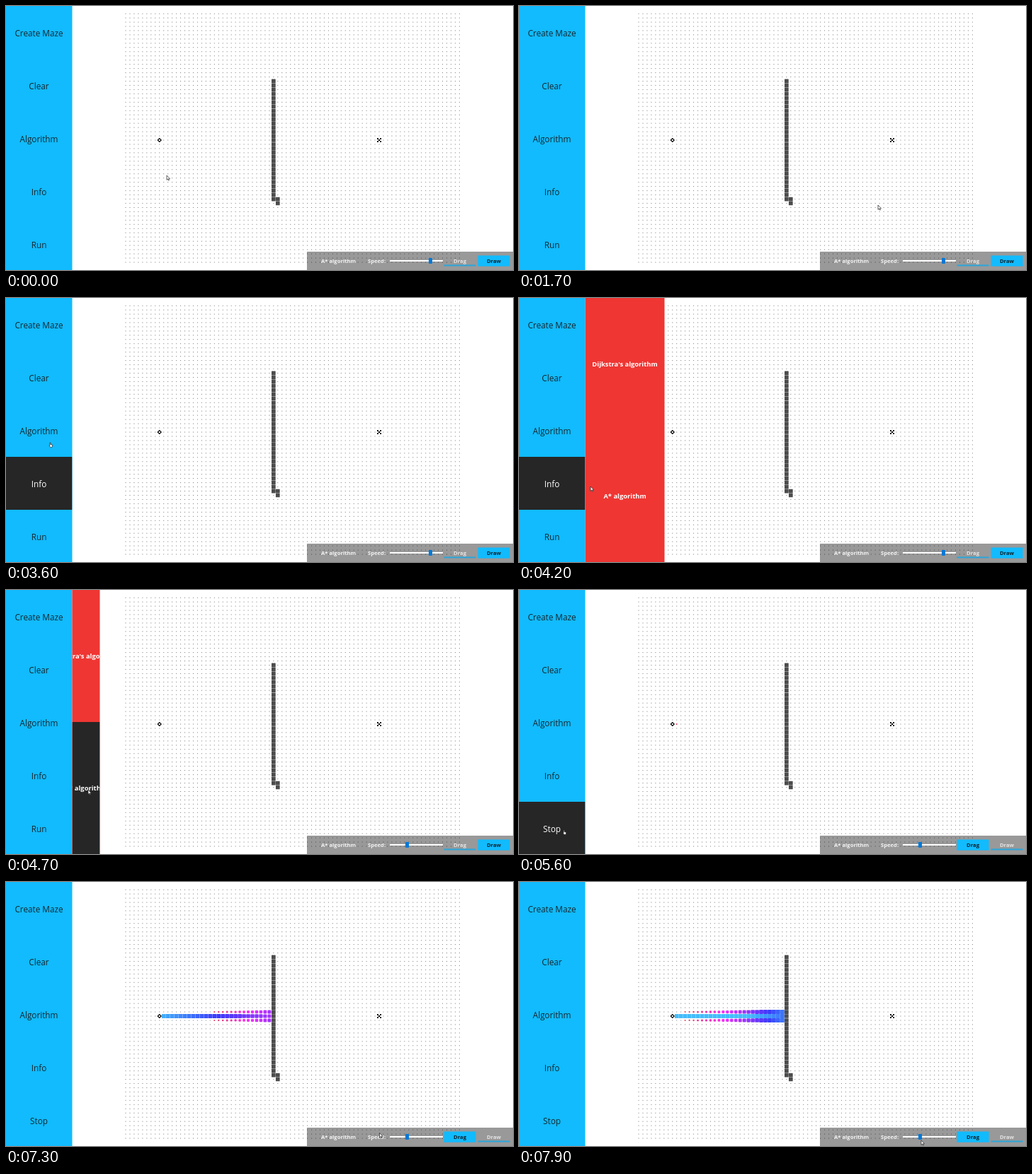
An HTML page with a canvas for the animation above (8 s loop, 716 px wide and 374 px high).

```html
<!DOCTYPE html>
<html lang="en">
<head>
<meta charset="utf-8">
<title>Pathfinding</title>
<style>
  html, body { margin: 0; width: 100%; height: 100%; overflow: hidden; background: #fff; }
  body { position: relative; font-family: "Open Sans", "Noto Sans", sans-serif; }
  canvas { position: absolute; left: 0; top: 0; width: 716px; height: 374px; }
  nav, #panel { position: absolute; top: 0; display: flex; flex-direction: column; overflow: hidden; transform: translateX(-.5px); }
  nav { left: 0; width: 94px; height: 375px; background: #11bbfd; color: #16262e; font-size: 11.75px; }
  #panel { left: 94px; height: 374px; background: #ef3633; color: #fff; font-size: 9.4px; font-weight: 700; }
  nav div, #panel div { flex: 1; display: flex; align-items: center; justify-content: center; white-space: nowrap; overflow: hidden; }
  #panel span { flex: none; }
  div.hover { background: #262626; color: #fff; }
  #bar { position: absolute; left: 425px; top: 348px; width: 291px; height: 26px;
         background: rgba(0, 0, 0, .4); color: #f4f4f4; font-size: 7.65px; font-weight: 700; line-height: 15px; }
  #bar > * { position: absolute; white-space: nowrap; }
  #bar .label { top: 6px; }
  .track { left: 117px; top: 12px; width: 75px; height: 2px; background: #fff; }
  #thumb { top: 9px; width: 5px; height: 8px; border-radius: 1px; background: #0078d7; }
  .tab { top: 6px; width: 45px; height: 15px; box-sizing: border-box; text-align: center; color: #e4e4e4;
         border-bottom: 2px solid #2ba6dc; transform: translate(-.5px, -.5px); }
  .tab.on { background: #11bbfd; border-color: #11bbfd; color: #10222b; }
  #cursor { position: absolute; left: 0; top: 0; width: 12px; height: 14px; overflow: visible; }
  #cursor path { stroke: #222; stroke-width: .7; fill: #fff; stroke-linejoin: round; }
</style>
</head>
<body>
<canvas id="grid" width="716" height="374"></canvas>
<nav>
  <div>Create Maze</div>
  <div>Clear</div>
  <div>Algorithm</div>
  <div>Info</div>
  <div id="run">Run</div>
</nav>
<div id="panel">
  <div><span>Dijkstra's algorithm</span></div>
  <div><span>A* algorithm</span></div>
</div>
<div id="bar">
  <span class="label" style="left:20px">A* algorithm</span>
  <span class="label" style="left:86px">Speed:</span>
  <i class="track"></i><i id="thumb"></i>
  <span id="drag" class="tab" style="left:194px">Drag</span>
  <span id="draw" class="tab" style="left:242px">Draw</span>
</div>
<svg id="cursor"><path id="shape"/></svg>
<script>
const LOOP = 8000, STEP = 100;
const PITCH = 5.967, LEFT = 169, TOP = 11, COLS = 80, ROWS = 60;
const START_COL = 8, GOAL_COL = 60, MID_ROW = 30, WALL_COL = 35;
const NAV_WIDTH = 93.5, PANEL_WIDTH = 112;
const OPEN_AT = 3950, PICK_AT = 4540, RUN_AT = 5500, SLIDE = 245;

const $ = id => document.getElementById(id);
const ctx = $('grid').getContext('2d');
const navItems = [...document.querySelectorAll('nav div')];
const panelItems = [...document.querySelectorAll('#panel div')];
const cellX = col => LEFT + col * PITCH;
const cellY = row => TOP + row * PITCH;
const clamp = v => Math.min(1, Math.max(0, v));

// Time, x, y of the stops between which the pointer glides
const pointerStops = [
  [500, 227, 240], [1200, 218, 227], [1600, 218, 227], [1700, 507, 282], [2200, 503, 286],
  [3100, 106, 315], [3600, 61, 205], [3900, 58, 195], [4200, 101, 267], [4700, 116, 283],
  [5300, 62, 340], [5800, 62, 340], [6600, 300, 310], [7400, 560, 362], [7900, 568, 366]
];
const cursors = {
  arrow: 'M0 0V6.4L1.5 5 2.5 7.2 3.4 6.8 2.5 4.8H4.5Z',
  point: 'M1 0H2V2.6L4.8 3.2 4.1 6.4H1.7L0 4 1 3.8Z',
  grab: 'M1.4 5V1.4L4 .6 6.5 2V6.2L5.6 9H2.4L0 5.2Z'
};

function pointerAt(t) {
  const next = pointerStops.findIndex(stop => t < stop[0]);
  if (next <= 0) return pointerStops.at(next).slice(1);
  const [t0, x0, y0] = pointerStops[next - 1], [t1, x1, y1] = pointerStops[next];
  const k = (t - t0) / (t1 - t0);
  return [x0 + (x1 - x0) * k, y0 + (y1 - y0) * k];
}

const panelWidthAt = t =>
  PANEL_WIDTH * (clamp((t - OPEN_AT) / SLIDE) - clamp((t - PICK_AT) / SLIDE));

// Highlights trail the pointer by one step
function hoveredAt(t) {
  const [x, y] = pointerAt(t - STEP);
  if (x < NAV_WIDTH) return navItems[Math.floor(y / 75)];
  if (x < NAV_WIDTH + panelWidthAt(t)) return panelItems[Math.floor(y / 187)];
}

function fillBox(x, y, size, radius, color) {
  ctx.fillStyle = color;
  ctx.beginPath();
  ctx.roundRect(x - size / 2, y - size / 2, size, size, radius);
  ctx.fill();
}

// Visited cells grow from a red dot through magenta and violet to a light blue square
function drawVisit(col, row, age) {
  if (age < 0) return;
  age = Math.min(age, 1760);
  const x = cellX(col), y = cellY(row);
  const size = Math.min(5.85, 2 + age * 0.0034);
  const hue = 350 - age * 0.085, saturation = Math.min(96, 68 + age * 0.05), light = 56 + age * 0.0035;
  fillBox(x, y, 2.4, 0, '#fff');
  fillBox(x, y, size, size * Math.max(0, 0.5 - age / 3400), `hsl(${hue} ${saturation}% ${light}%)`);
}

function drawStart() {
  ctx.save();
  ctx.translate(cellX(START_COL), cellY(MID_ROW));
  fillBox(0, 0, 6, 0, '#fff');
  ctx.rotate(Math.PI / 4);
  ctx.lineWidth = 1.2;
  ctx.strokeRect(-1.7, -1.7, 3.4, 3.4);
  ctx.restore();
}

function drawGoal() {
  const x = Math.round(cellX(GOAL_COL)), y = Math.round(cellY(MID_ROW));
  for (let c = -1; c <= 1; c++)
    for (let r = -1; r <= 1; r++)
      fillBox(x + c * 2, y + r * 2, 2, 0, (c + r) % 2 ? '#fff' : '#000');
}

function drawGrid(t) {
  ctx.clearRect(0, 0, 716, 374);
  ctx.fillStyle = '#777';
  for (let r = 0; r < ROWS; r++)
    for (let c = 0; c < COLS; c++)
      ctx.fillRect(cellX(c) - 0.5, cellY(r) - 0.5, 1, 1);

  const wall = (c, r) => fillBox(cellX(c), cellY(r), 5.7, 0.4, '#4c4c4c');
  for (let r = 16; r <= 44; r++) wall(WALL_COL, r);
  wall(WALL_COL + 1, 44);
  wall(WALL_COL + 1, 45);

  // The search runs straight to the wall, then widens back along both sides
  for (let c = START_COL + 1; c < WALL_COL; c++) {
    drawVisit(c, MID_ROW, t - 5600 - (c - START_COL - 1) * 32);
    const sideAge = t - 6400 - (WALL_COL - 1 - c) * 65;
    drawVisit(c, MID_ROW - 1, sideAge);
    drawVisit(c, MID_ROW + 1, sideAge);
  }
  drawStart();
  drawGoal();
}

function render(t) {
  drawGrid(t);

  const hovered = hoveredAt(t);
  for (const item of [...navItems, ...panelItems])
    item.classList.toggle('hover', item === hovered);
  $('panel').style.width = panelWidthAt(t) + 'px';

  const running = t >= RUN_AT;
  $('run').textContent = running ? 'Stop' : 'Run';
  $('drag').classList.toggle('on', running);
  $('draw').classList.toggle('on', !running);
  $('thumb').style.left = (t < PICK_AT ? 172 : 139) + 'px';

  const [x, y] = pointerAt(t);
  const onBar = x > 425 && y > 348;
  const kind = x < NAV_WIDTH ? 'point' : running && !onBar ? 'grab' : 'arrow';
  $('shape').setAttribute('d', cursors[kind]);
  $('cursor').style.transform = `translate(${x}px, ${y}px)`;
}

const begin = performance.now();
function tick() {
  const t = (performance.now() - begin) % LOOP;
  render(Math.floor(t / STEP) * STEP);
  requestAnimationFrame(tick);
}
tick();
</script>
</body>
</html>
```
